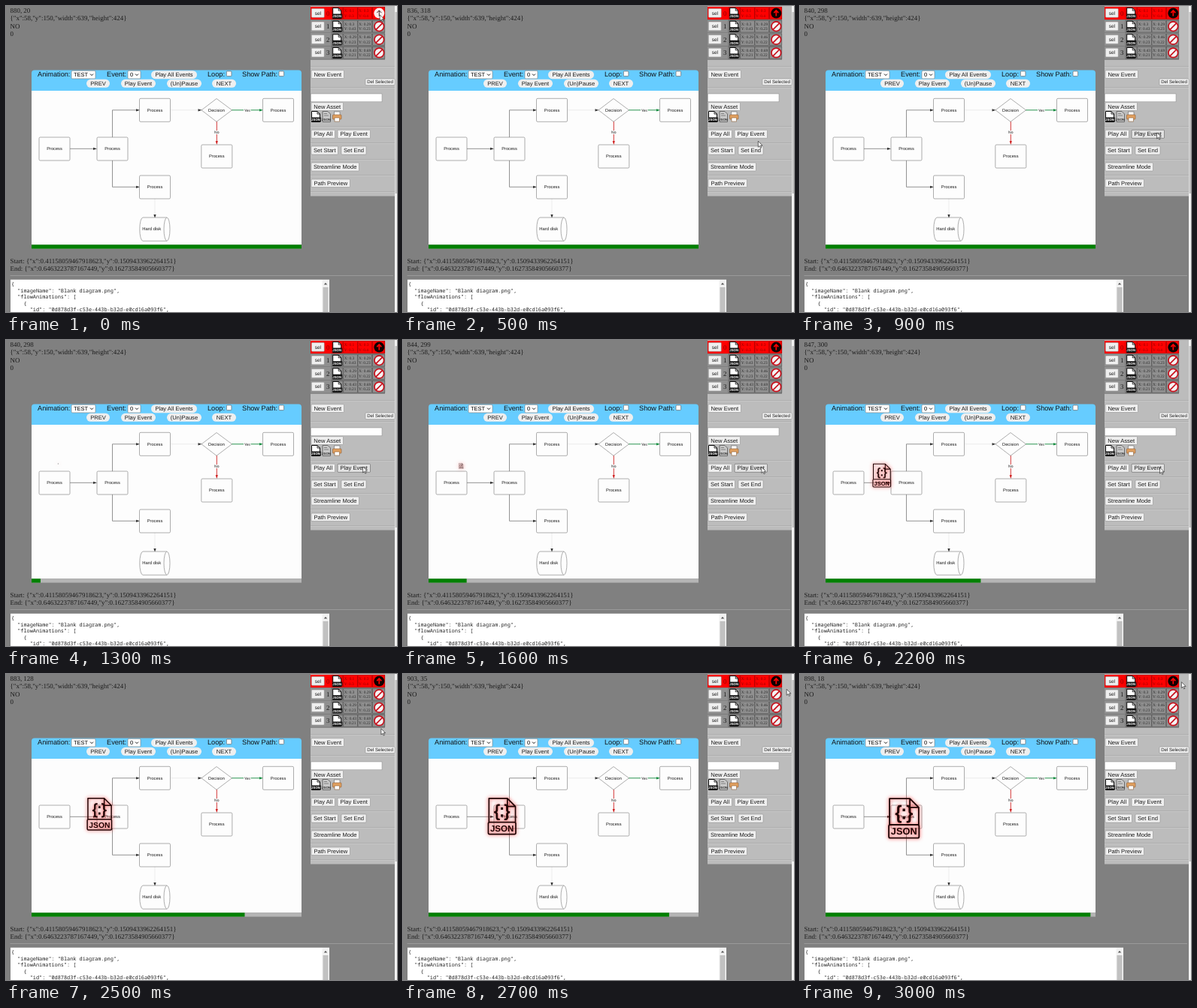
An HTML page for the animation above (3.1 s loop, 520 by 408 pixels).

```html
<!DOCTYPE html>
<html lang="en">
<head>
<meta charset="utf-8">
<title>Flow animation editor</title>
<style>
  html, body { margin: 0; width: 100%; height: 100%; overflow: hidden; background: #808080; }
  svg { display: block; width: 520px; height: 408px; text-rendering: geometricPrecision; }
  text { white-space: pre; }
  .serif { font-family: "Liberation Serif", "Times New Roman", serif; font-size: 8.93px; fill: #1c1c1c; }
  .sans { font-family: "Liberation Sans", Arial, sans-serif; }
  .mono { font-family: "Noto Sans Mono", "DejaVu Sans Mono", monospace; font-size: 6.87px; fill: #222; }
  .mid { text-anchor: middle; }
  .shape { fill: #fdfdfd; stroke: #777; stroke-width: .6; }
  .edge { fill: none; stroke: #666; stroke-width: .7; }
  .btn { fill: #efefef; stroke: #868686; stroke-width: .5; }
  .pill { fill: #efefef; }
  .btn.hover { fill: #e2e2e2; stroke: #444; }
  #asset { filter: drop-shadow(0 0 2.4px rgba(255, 0, 0, .8)); }
</style>
</head>
<body>
<svg id="stage" viewBox="0 0 520 408"></svg>
<script>
const LOOP = 3100, STEP = 100;
const PLAY_AT = 1017, PLAY_FOR = 2195;
const PAGE_SCALE = 0.565;
const BAR_WIDTH = 359;

// Pointer stops: time, page x, page y
const STOPS = [
  [0, 880, 20], [500, 836, 318], [900, 840, 298], [1400, 840, 298],
  [1800, 847, 300], [2200, 847, 300], [2700, 903, 35], [3000, 898, 18]
];

const rect = (x, y, w, h, attrs = '') =>
  `<rect x="${x}" y="${y}" width="${w}" height="${h}" ${attrs}/>`;
const text = (x, y, str, cls, attrs = '') =>
  `<text x="${x}" y="${y}" class="${cls}" ${attrs}>${str}</text>`;
const path = (d, attrs = 'class="edge"') => `<path d="${d}" ${attrs}/>`;
const label = (x, y, str, size = 7.6) =>
  text(x, y + size * .35, str, 'sans mid', `font-size="${size}" fill="#1a1a1a"`);

function button(x, y, w, h, str, { size = 7.6, id = '', pill = false } = {}) {
  const look = pill ? `class="pill" rx="${h / 2}"` : 'class="btn" rx="1"';
  return rect(x, y, w, h, `${look}${id && ` id="${id}"`}`) + label(x + w / 2, y + h / 2, str, size);
}

function select(x, w, str) {
  const c = x + w - 5;
  return rect(x, 86.3, w, 10.6, 'rx="1.5" fill="#fff" stroke="#777" stroke-width=".6"') +
    text(x + 3, 94.3, str, 'sans', 'font-size="7.5"') +
    path(`M${c - 2},90.6l2,2l2,-2`, 'fill="none" stroke="#111" stroke-width="1"');
}

const checkbox = x => rect(x, 87, 6.6, 6.6, 'rx="1" fill="#fff" stroke="#666" stroke-width=".7"');

const box = (x, y) =>
  rect(x, y, 41, 31, 'class="shape" rx="1.5"') + label(x + 20.5, y + 15.5, 'Process', 5.7);

const head = (x, y, turn, color) =>
  path('M0,0l-5,-1.6v3.2z', `transform="translate(${x} ${y}) rotate(${turn})" fill="${color}"`);

const use = (id, x, y) => `<use href="#${id}" x="${x}" y="${y}"/>`;

const rule = y => rect(405, y, 112, .7, 'fill="#909090"') + rect(405, y + .7, 112, .7, 'fill="#d4d4d4"');

const tinyJson = fill => text(0, 5.8, 'JSON', 'sans mid', `font-size="4.4" font-weight="700" fill="${fill}"`);
const defs = `<defs>
  <g id="doc">
    ${path('M-19.5,9V-26.5H8L20,-14.5V9M8,-26.5V-14.5H20', 'fill="none" stroke-linejoin="round"')}
    ${rect(-20.5, 9, 41, 18, 'rx="2" fill="none"')}
    ${text(0, 1, '{:}', 'sans mid', 'font-size="25" stroke-width="1"')}
    ${text(0, 22.7, 'JSON', 'sans mid', 'font-size="13" font-weight="700" stroke="none"')}
  </g>
  <g id="file">
    ${path('M-5.5,7V-7H2L5.5,-3.5V7Z', 'fill="#fff" stroke="#000" stroke-width="1"')}
    ${path('M2,-7V-3.5H5.5', 'fill="none" stroke="#000" stroke-width=".8"')}
    ${rect(-6, 1, 13, 6, 'rx=".8" fill="#111"')}${tinyJson('#fff')}
  </g>
  <g id="grayFile">
    ${path('M-5,7V-7H2L5.5,-3.5V7Z', 'fill="#c8c8c8" stroke="#555" stroke-width=".8"')}
    ${path('M-3,-4h4M-3,-1.5h6', 'stroke="#666" stroke-width=".7"')}${tinyJson('#333')}
  </g>
</defs>`;

const info = [
  text(5.5, 9, '', 'serif', 'id="coords"'),
  text(5.5, 19.3, '{"x":58,"y":150,"width":639,"height":424}', 'serif'),
  text(5.5, 29.8, 'NO', 'serif'),
  text(5.5, 40, '0', 'serif'),
  text(5.5, 342.6, 'Start: {"x":0.41158059467918623,"y":0.1509433962264151}', 'serif'),
  text(5.5, 353, 'End: {"x":0.6463223787167449,"y":0.16273584905660377}', 'serif'),
  rect(5.5, 359, 509.5, .8, 'fill="#a0a0a0"'),
  rect(517, 0, 3, 408, 'fill="#f1f1f1"'),
  rect(517.5, 8, 2.5, 242, 'fill="#c1c1c1"')
].join('');

const source = [
  '{',
  '  "imageName": "Blank diagram.png",',
  '  "flowAnimations": [',
  '    {',
  '      "id": "0d878d3f-c53e-443b-b32d-e0cd16a093f6",'
];
const editor = rect(6, 364.8, 424, 50, 'fill="#fff"') +
  rect(420.5, 365.2, 9, 50, 'fill="#f1f1f1"') + rect(421.5, 375, 7, 40, 'fill="#c1c1c1"') +
  path('M422.8,371.5l2.2,-2.6l2.2,2.6z', 'fill="#505050"') +
  source.map((line, i) => text(7, 373.2 + i * 8.55, line, 'mono')).join('');

const title = (x, str) => text(x, 94.4, str, 'sans', 'font-size="9.2" fill="#111"');
const pill = (x, y, w, str) => button(x, y, w, 11, str, { pill: true });
const player = [
  path('M34,113V89.5a4,4 0 0 1 4,-4H389a4,4 0 0 1 4,4V113Z', 'fill="#66ccff"'),
  rect(34, 113, 359, 205.3, 'fill="#fdfdfd"'),
  title(42, 'Animation:'), select(87, 32, 'TEST'),
  title(134, 'Event:'), select(162, 17, '0'),
  pill(193, 86.2, 61, 'Play All Events'),
  title(268, 'Loop:'), checkbox(293.3),
  title(314, 'Show Path:'), checkbox(363),
  pill(107, 97.8, 31, 'PREV'), pill(153, 97.8, 46, 'Play Event'),
  pill(214, 97.8, 46, '(Un)Pause'), pill(274, 97.8, 32, 'NEXT'),
  rect(34, 318.3, 359, 5.3, 'fill="#b4b4b4"'),
  rect(34, 318.3, 359, 5.3, 'fill="#008000" id="bar"')
].join('');

const green = '#118a3c', red = '#d02020', ink = '#333';
const diagram = [
  path('M85,190.3H116M141.5,175V138.8H173M141.5,206V241.3H173'),
  path('M219,138.8H256M198,257V278', 'fill="none" stroke="#e4e4e4" stroke-width=".7"'),
  head(121, 190.3, 0, ink), head(178, 138.8, 0, ink), head(178, 241.3, 0, ink),
  head(260.5, 138.8, 0, ink), head(198, 283, 90, ink),
  path('M300,138.8H338', `fill="none" stroke="${green}" stroke-width=".9"`), head(342, 138.8, 0, green),
  path('M280.3,154V181', `fill="none" stroke="${red}" stroke-width=".9"`), head(280.3, 185, 90, red),
  rect(316, 136, 9.5, 5.5, 'fill="#fdfdfd"'), label(320.8, 138.8, 'Yes', 5),
  rect(276.5, 166, 7.5, 5, 'fill="#fdfdfd"'), label(280.3, 168.6, 'No', 5),
  box(44, 175), box(121, 175), box(177.5, 123.3), box(177.5, 226), box(341.5, 123.3), box(259.8, 185),
  path('M260,138.8L280,123.5L300.5,138.8L280,154.3Z', 'class="shape"'), label(280, 138.8, 'Decision', 5.7),
  path('M182,282H214A4,15.6 0 0 1 214,313.3H182A4.2,15.6 0 0 1 182,282Z', 'class="shape"'),
  path('M214,282A4,15.6 0 0 0 214,313.3', 'class="shape"'),
  label(193.8, 297.3, 'Hard disk', 5.9)
].join('');

const points = [
  ['0.1', '0.3', '0.3', '0.4'], ['0.3', '0.43', '0.29', '0.23'],
  ['0.29', '0.23', '0.46', '0.22'], ['0.43', '0.21', '0.69', '0.22']
];
function row([x1, y1, x2, y2], i) {
  const y = 1 + i * 17.6, c = y + 8.6, first = i === 0;
  const back = `fill="${first ? '#f00' : '#909090'}"`;
  const frame = `${back} stroke="${first ? '#a00000' : '#505050'}" stroke-width=".6"`;
  const style = `style="font-size:5.4px;fill:${first ? '#8a0000' : '#2a2a2a'}"`;
  const cell = (x, a, b) => rect(x, y + .8, 18.5, 15.6, frame) +
    text(x + 1, y + 7.2, `X: ${a}`, 'serif', style) + text(x + 1, y + 13.6, `Y: ${b}`, 'serif', style);
  const mark = first
    ? `<circle id="upDisc" cx="496.3" cy="${c}" r="7"/>` +
      path(`M496.3,${c + 4}v-7.5m-3,3l3,-3.2l3,3.2`, 'id="upArrow" fill="none"')
    : `<circle cx="496.3" cy="${c}" r="6.3" fill="#f4f4f4" stroke="#c8101c" stroke-width="1.7"/>` +
      path(`M491.9,${c + 4.4}l8.8,-8.8`, 'stroke="#c8101c" stroke-width="1.7"');
  return rect(405, y, 99, 17.2, back) +
    rect(405, y + 17, 99, .7, 'fill="#606060"') +
    button(406.3, y + 2.4, 17, 11.8, 'sel', { size: 6.5 }) +
    text(428.3, c + 3, i, 'serif mid', first ? 'style="fill:#8a0000"' : '') +
    rect(433, y + .8, 15, 15.6, frame) + use('file', 440.2, c) +
    cell(448.8, x1, y1) + cell(468, x2, y2) +
    rect(487.4, y + .8, 16.4, 15.6, frame) + mark;
}

const sidebar = [
  rect(405, 0, 112, 253.5, 'fill="#bcbcbc"'),
  points.map(row).join(''),
  [80, 108, 160, 182, 204, 225, 247].map(rule).join(''),
  button(406, 85.7, 43.5, 10.8, 'New Event'),
  button(478, 97, 39, 8.6, 'Del Selected', { size: 6.1 }),
  rect(405.3, 117, 94.7, 10.8, 'fill="#fff" stroke="#888" stroke-width=".5"'),
  button(406, 128.7, 42.5, 10.8, 'New Asset'),
  use('file', 412, 147.5), use('grayFile', 426, 147.5),
  rect(436.5, 141, 7.5, 5, 'fill="#fff" stroke="#666" stroke-width=".6"'),
  rect(434.5, 145, 11.5, 6, 'rx="1" fill="#e0a060" stroke="#8a5a30" stroke-width=".6"'),
  rect(437, 149, 6.5, 5, 'fill="#fff" stroke="#8a5a30" stroke-width=".6"'),
  button(406, 165.3, 31.5, 11, 'Play All'),
  button(441, 165.3, 43.5, 11, 'Play Event', { id: 'play' }),
  button(406, 187, 35.5, 11, 'Set Start'),
  button(446, 187, 33, 11, 'Set End'),
  button(406, 209, 63.5, 11, 'Streamline Mode'),
  button(406, 231, 51.5, 10.6, 'Path Preview')
].join('');

const pointer = path('M0,0V8L1.9,6.3L3.2,9.2L4.5,8.6L3.2,5.8H5.7Z',
  'id="pointer" fill="#fff" stroke="#111" stroke-width=".6"');
const asset = '<g id="asset"><use id="assetDoc" href="#doc" stroke="#200404" stroke-width="1.9" fill="#200404"/></g>';

const $ = id => document.getElementById(id);
$('stage').innerHTML = defs + info + editor + player + diagram + sidebar + asset + pointer;

const smooth = k => k * k * (3 - 2 * k);
const easeInOut = k => k < .5 ? 2 * k * k : 1 - 2 * (1 - k) ** 2;

function pointerAt(t) {
  const i = STOPS.findIndex(s => s[0] > t);
  if (i < 0) return STOPS[STOPS.length - 1].slice(1);
  const [t0, x0, y0] = STOPS[i - 1], [t1, x1, y1] = STOPS[i];
  const k = smooth((t - t0) / (t1 - t0));
  return [Math.round(x0 + (x1 - x0) * k), Math.round(y0 + (y1 - y0) * k)];
}

function draw(t) {
  const [px, py] = pointerAt(t);
  const x = px * PAGE_SCALE, y = py * PAGE_SCALE + .5;
  $('coords').textContent = `${px}, ${py}`;
  $('pointer').setAttribute('transform', `translate(${x} ${y})`);
  $('play').classList.toggle('hover', x > 441 && x < 484.5 && y > 165 && y < 176.5);

  const over = Math.hypot(x - 496.3, y - 9.6) < 7;
  $('upDisc').setAttribute('fill', over ? '#fbeeee' : '#100');
  $('upArrow').setAttribute('stroke', over ? '#422' : '#f00');
  $('upArrow').setAttribute('stroke-width', over ? 1 : 1.7);

  const playing = t >= PLAY_AT;
  const p = playing ? easeInOut((t - PLAY_AT) / PLAY_FOR) : 1;
  $('bar').setAttribute('width', BAR_WIDTH * p);
  $('asset').style.display = playing ? '' : 'none';
  $('assetDoc').setAttribute('transform', `translate(${67 + 72.6 * p} ${164 + 28.7 * p}) scale(${p})`);
}

const start = performance.now();
function tick() {
  const t = (performance.now() - start) % LOOP;
  draw(Math.floor(t / STEP) * STEP);
  requestAnimationFrame(tick);
}
tick();
</script>
</body>
</html>
```
